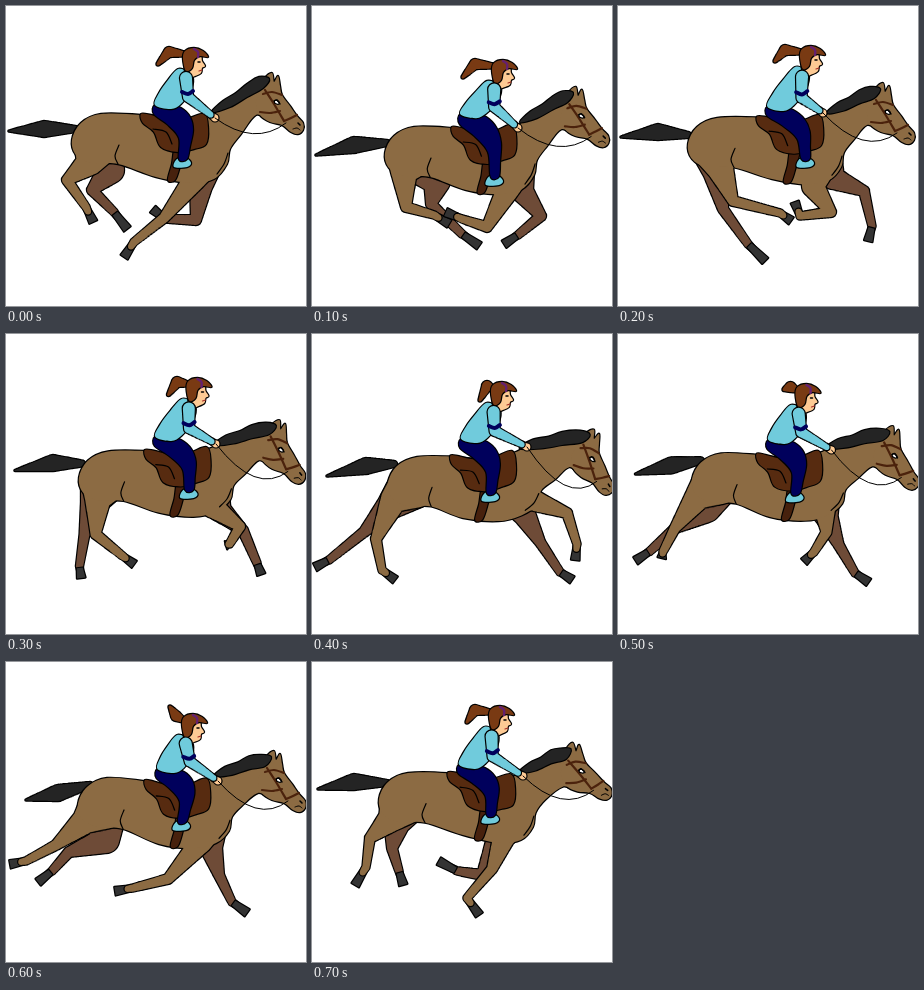
An HTML page with a canvas that plays this animation: 300 by 300 pixels, repeating every 0.8 s.

```html
<!DOCTYPE html>
<html lang="en">
<head>
<meta charset="utf-8">
<title>Galloping horse</title>
<style>
html, body { margin: 0; width: 100%; height: 100%; overflow: hidden; background: #fff; }
canvas { display: block; width: 100vw; height: 100vh; }
</style>
</head>
<body>
<canvas id="stage" width="300" height="300"></canvas>
<script>
const c = document.getElementById('stage').getContext('2d');
const COAT = '#8c6b43', SHADE = '#6e4b37', BLACK = '#242424', LEATHER = '#572b10',
  SHIRT = '#70cbdc', NAVY = '#00005c', HAIR = '#793a13', SKIN = '#fdca94';

// horse: shifts of rump, saddle, withers, head; rider: shifts of head, seat, foot
// legs: four joints each, in the order near hind, far hind, near fore, far fore
const pose = (horse, tilt, rider, hand, pony, tail, ...legs) =>
  ({ horse, tilt, rider, hand, pony, tail, legs });

const keys = [
  pose([0, 0, 0, 0, 0, 0, 0, 0], 0, [0, 0, 0, 0, 0, 0], [209, 112], [163, 46, 152, 58], [70, 123, 38, 123, 3, 125],
    [84, 156, 61, 174, 80, 201, 87, 216], [105, 164, 86, 184, 108, 206, 121, 223],
    [188, 174, 158, 212, 128, 236, 118, 251], [195, 180, 190, 214, 159, 213, 147, 203]),
  pose([7, 13, 4, 13, 2, 10, -2, 14], -.03, [3, 12, -1, 9, 6, 18], [206, 122], [163, 58, 151, 71], [75, 137, 42, 139, 4, 149],
    [92, 165, 94, 201, 122, 209, 137, 218], [125, 175, 119, 198, 150, 228, 167, 240],
    [195, 185, 175, 221, 150, 213, 134, 206], [210, 185, 229, 210, 206, 229, 192, 238]),
  pose([4, 4, 4, 2, 3, 1, -1, 10], 0, [5, -2, 0, 2, 11, 0], [205, 107], [167, 44, 157, 55], [70, 129, 40, 126, 3, 131],
    [102, 162, 115, 195, 162, 207, 173, 215], [98, 165, 105, 203, 130, 238, 147, 255],
    [195, 180, 213, 206, 182, 210, 177, 196], [215, 172, 246, 185, 254, 220, 250, 235]),
  pose([10, 15, 1, 13, 2, 8, 14, 28], .22, [2, 6, 0, 6, 2, 6], [215, 113], [175, 52, 168, 66], [82, 130, 54, 132, 15, 142],
    [82, 165, 64, 205, 70, 236, 83, 246], [78, 172, 52, 198, 17, 226, 3, 233],
    [218, 165, 255, 179, 265, 210, 263, 226], [212, 180, 228, 208, 248, 238, 260, 246]),
  pose([6, 8, 3, 11, 2, 8, 2, 22], 0, [-1, 10, 3, 8, -1, 7], [212, 119], [170, 54, 164, 45], [84, 123, 52, 131, 20, 138],
    [80, 158, 50, 183, 20, 199, 4, 202], [100, 178, 63, 190, 46, 209, 32, 220],
    [195, 180, 162, 217, 127, 226, 109, 229], [205, 185, 213, 213, 226, 240, 241, 251]),
  pose([1, 3, 1, 2, 1, 5, -4, 14], -.14, [0, 2, -2, 4, 2, 0], [211, 114], [163, 48, 155, 60], [75, 121, 42, 120, 6, 127],
    [80, 156, 58, 176, 54, 205, 43, 223], [85, 160, 80, 186, 87, 209, 91, 223],
    [192, 175, 180, 207, 155, 236, 167, 253], [185, 180, 170, 213, 145, 209, 127, 199])
];

function mix(a, b, t = .5) {
  if (typeof a === 'number') return a + (b - a) * t;
  if (Array.isArray(a)) return a.map((v, i) => mix(v, b[i], t));
  return Object.fromEntries(Object.keys(a).map(k => [k, mix(a[k], b[k], t)]));
}
const [k0, k1, k2, k3, k4, k5] = keys;
const poses = [k0, k1, k2, mix(k2, k3), k3, mix(k3, k4), k4, k5];

const pairs = a => Array.from({ length: a.length / 2 }, (_, i) => [a[2 * i], a[2 * i + 1]]);

// Piecewise linear shift: stops[i] belongs to the i-th pair of shifts
function shift(v, stops, shifts) {
  const s = pairs(shifts);
  let i = 0;
  while (i < stops.length - 2 && v > stops[i + 1]) i++;
  const t = Math.min(1, Math.max(0, (v - stops[i]) / (stops[i + 1] - stops[i])));
  return mix(s[i], s[i + 1], t);
}

// Smooth curve through the points
function curve(pts, closed = true) {
  const n = pts.length, p = new Path2D();
  const at = i => closed ? pts[(i + n) % n] : pts[Math.min(n - 1, Math.max(0, i))];
  p.moveTo(...pts[0]);
  for (let i = 0; i < (closed ? n : n - 1); i++) {
    const [a, b, d, e] = [at(i - 1), at(i), at(i + 1), at(i + 2)];
    p.bezierCurveTo(b[0] + (d[0] - a[0]) / 6, b[1] + (d[1] - a[1]) / 6,
      d[0] - (e[0] - b[0]) / 6, d[1] - (e[1] - b[1]) / 6, ...d);
  }
  if (closed) p.closePath();
  return p;
}

// Limb of changing thickness along the joints
function limb(pts, radii) {
  const p = new Path2D();
  for (let i = 0; i < pts.length - 1; i++)
    for (let k = 0; k <= 40; k++) {
      const [x, y] = mix(pts[i], pts[i + 1], k / 40), r = mix(radii[i], radii[i + 1], k / 40);
      p.moveTo(x + r, y);
      p.arc(x, y, r, 0, 7);
    }
  return p;
}

function line(path, color = '#000', width = 1.2) {
  c.strokeStyle = color;
  c.lineWidth = width;
  c.stroke(path);
}

// Parts share one outline: all strokes first, then all fills
function paint(color, ...paths) {
  paths.forEach(p => line(p, '#000', 2.4));
  c.fillStyle = color;
  paths.forEach(p => c.fill(p));
}

function hoof([x, y], [tx, ty]) {
  const l = Math.hypot(tx - x, ty - y), u = (tx - x) / l, v = (ty - y) / l;
  const p = new Path2D();
  [[2, -3], [l, -4.5], [l, 4], [2, 3]].forEach(([d, w]) => p.lineTo(x + u * d - v * w, y + v * d + u * w));
  p.closePath();
  paint('#333', p);
}

function draw(q) {
  const onHorse = (...a) => pairs(a).map(([x, y]) => {
    const [dx, dy] = shift(x, [95, 150, 210, 262], q.horse);
    return [x + dx, y + dy];
  });
  const cos = Math.cos(q.tilt), sin = Math.sin(q.tilt);
  const onHead = (...a) => pairs(a).map(([x, y]) => {
    const u = x - 264, v = y - 76;
    return [264 + u * cos - v * sin + q.horse[6], 76 + u * sin + v * cos + q.horse[7]];
  });
  const onRider = (...a) => pairs(a).map(([x, y]) => {
    const [dx, dy] = shift(y, [65, 102, 155], q.rider);
    return [x + dx, y + dy];
  });

  c.fillStyle = '#fff';
  c.fillRect(0, 0, 300, 300);
  c.lineJoin = c.lineCap = 'round';

  paint(BLACK, limb(pairs(q.tail), [3, 8, .6]));

  const legs = q.legs.map((l, i) => {
    const j = pairs(l), hind = i < 2;
    const root = onHorse(...(hind ? [92, 135] : [199, 148]))[0];
    const path = limb([root, ...j.slice(0, 3), mix(j[2], j[3], .3)],
      hind ? [24, 13, 5, 3.6, 3] : [21, 11, 5, 3.6, 3]);
    return { path, hoof: () => hoof(j[2], j[3]) };
  });
  for (const i of [1, 3]) {
    paint(SHADE, legs[i].path);
    legs[i].hoof();
  }
  legs[0].hoof();
  legs[2].hoof();

  // Horse
  const torso = curve([
    ...onHorse(66, 134, 75, 117, 95, 108, 135, 109, 170, 114, 200, 110, 213, 103, 238, 87),
    ...onHead(259, 79, 272, 92, 264, 113, 250, 109),
    ...onHorse(235, 128, 224, 143, 221, 158, 208, 173, 185, 177, 150, 171, 112, 158, 85, 157, 70, 149)
  ]);
  const head = curve(onHead(256, 82, 259, 72, 266, 67, 268, 76, 272, 70, 274, 80, 276, 89, 284, 100,
    291, 110, 297, 117, 297, 124, 292, 128, 285, 126, 276, 119, 264, 116, 254, 109, 250, 96));
  paint(COAT, legs[0].path, legs[2].path, torso, head);
  line(curve(onHorse(113, 139, 109, 150, 112, 158), false));
  line(curve(onHorse(222, 147, 218, 158, 211, 168), false));
  paint(BLACK, curve([
    ...onHead(263, 73, 253, 71),
    ...onHorse(241, 78, 230, 87, 217, 95, 206, 106, 224, 101, 241, 91),
    ...onHead(257, 82)
  ]));
  for (const strap of [[257, 88, 266, 86, 276, 89], [259, 84, 268, 98, 278, 115], [278, 115, 285, 112, 291, 109], [254, 106, 264, 107, 274, 105]])
    line(curve(onHead(...strap), false), '#4b220c', 2.2);
  paint('#fff', limb(onHead(270, 96, 272, 97), [1, .8]));
  line(curve(onHead(268, 95, 271, 94, 274, 98), false), '#000', 1.4);
  line(curve(onHead(292, 117, 294, 119), false), '#000', 1.6);
  line(curve(onHead(287, 123, 291, 122, 294, 124), false), '#000', 1);

  // Saddle
  paint('#47210d', curve(onHorse(169, 142, 178, 142, 174, 160, 169, 174, 162, 174, 166, 158)));
  paint(LEATHER, curve(onHorse(135, 108, 145, 109, 160, 113, 180, 113, 198, 108, 202, 122, 200, 138,
    188, 143, 172, 146, 155, 141, 148, 126, 137, 117)));
  line(curve(onHorse(147, 123, 160, 126, 166, 138), false));

  // Rider
  paint(SHIRT, curve(onRider(171, 153, 180, 152, 185, 157, 181, 161, 168, 161)));
  paint(NAVY, curve(onRider(149, 99, 163, 99, 175, 102, 184, 111, 187, 124, 184, 140, 181, 153,
    173, 153, 173, 132, 161, 118, 148, 108)));
  paint(SHIRT, curve(onRider(172, 63, 182, 66, 187, 73, 184, 86, 175, 98, 165, 103, 149, 99, 153, 87, 162, 74)));
  paint(SKIN, curve(onRider(180, 48, 194, 47, 196, 55, 199, 60, 196, 62, 195, 67, 189, 70, 184, 71, 179, 65)));
  paint(HAIR, limb([...onRider(178, 48), ...pairs(q.pony)], [2.5, 5, 1.5]));
  paint(HAIR, curve(onRider(177, 53, 179, 45, 188, 42, 197, 45, 202, 51, 194, 50, 188, 54, 186, 62, 180, 65)));
  line(curve(onRider(188, 43, 192, 46, 192, 51), false), '#65206f', 2.4);
  line(curve(onRider(192, 56, 194, 56), false), '#000', 1.5);
  line(curve(onRider(193, 65, 196, 64), false), '#a52c25', 1.2);

  const hand = q.hand, [shoulder, elbow] = onRider(180, 72, 182, 91);
  const wrist = mix(elbow, hand, .84);
  paint(SKIN, limb([wrist, hand], [2.4, 3.4]));
  paint(SHIRT, limb([shoulder, elbow, wrist], [6, 5, 2.8]));
  line(curve(onRider(176, 86, 182, 88, 187, 85), false), NAVY, 4);

  const rein = new Path2D(), bit = onHead(280, 117)[0];
  rein.moveTo(...hand);
  rein.quadraticCurveTo((hand[0] + bit[0]) / 2 + 4, Math.max(hand[1], bit[1]) + 24, ...bit);
  line(rein, '#000', 1);
}

function tick() {
  draw(poses[Math.floor(performance.now() / 100) % poses.length]);
  requestAnimationFrame(tick);
}
tick();
</script>
</body>
</html>
```
